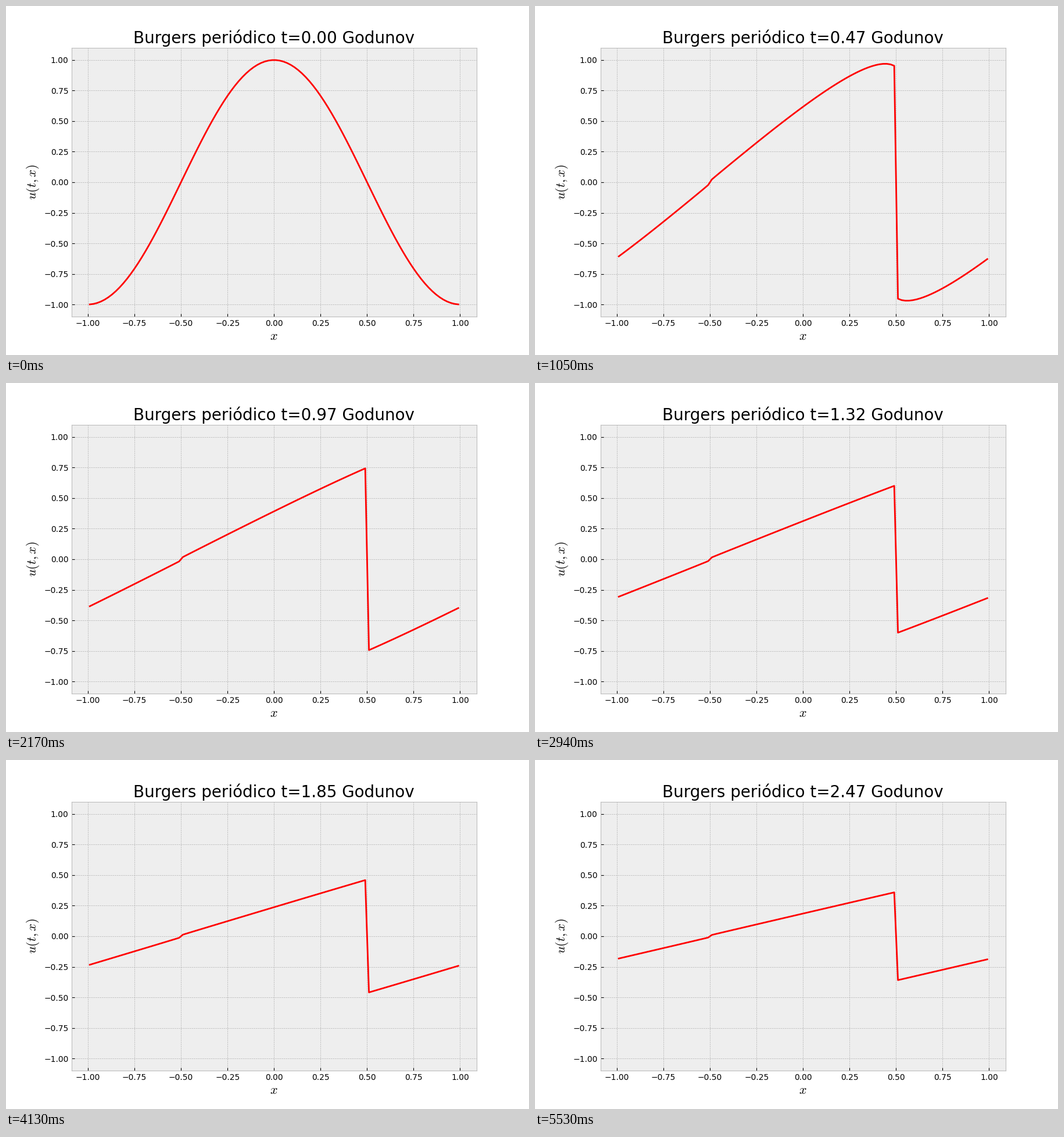
Write a matplotlib script that moves like this. It is 900x600 px and loops after 5600 ms.

```python
import numpy as np
import matplotlib.pyplot as plt
from matplotlib.animation import FuncAnimation

plt.style.use("bmh")
plt.rcParams["font.family"] = "DejaVu Sans"

CELLS = 100
STEPS = 400
STRIDE = 5
T_END = 2.5

dx = 2 / CELLS
x = -1 + dx * (np.arange(CELLS) + 0.5)
times = np.linspace(0, T_END, STEPS)
dt = times[1]


def godunov_flux(left, right):
    """Exact Riemann flux of u^2/2 at each cell face."""
    return np.maximum(np.maximum(left, 0) ** 2, np.minimum(right, 0) ** 2) / 2


def solve():
    u = np.cos(np.pi * x)
    history = [u]
    for _ in range(STEPS - 1):
        flux = godunov_flux(u, np.roll(u, -1))
        u = u - dt / dx * (flux - np.roll(flux, 1))
        history.append(u)
    return history


history = solve()

fig, ax = plt.subplots(figsize=(9, 6), dpi=100)
line, = ax.plot(x, history[0], color="red", lw=2)
ax.set_xlim(ax.get_xlim())
ax.set_ylim(ax.get_ylim())
ax.set_xlabel("$x$", fontsize=16)
ax.set_ylabel("$u(t,x)$", fontsize=16)
title = ax.set_title("", fontsize=20)


def update(frame):
    step = frame * STRIDE
    line.set_ydata(history[step])
    title.set_text(f"Burgers periódico t={times[step]:.2f} Godunov")
    return line, title


anim = FuncAnimation(fig, update, frames=STEPS // STRIDE, interval=70,
                     repeat=True, repeat_delay=0)
plt.show()
```
